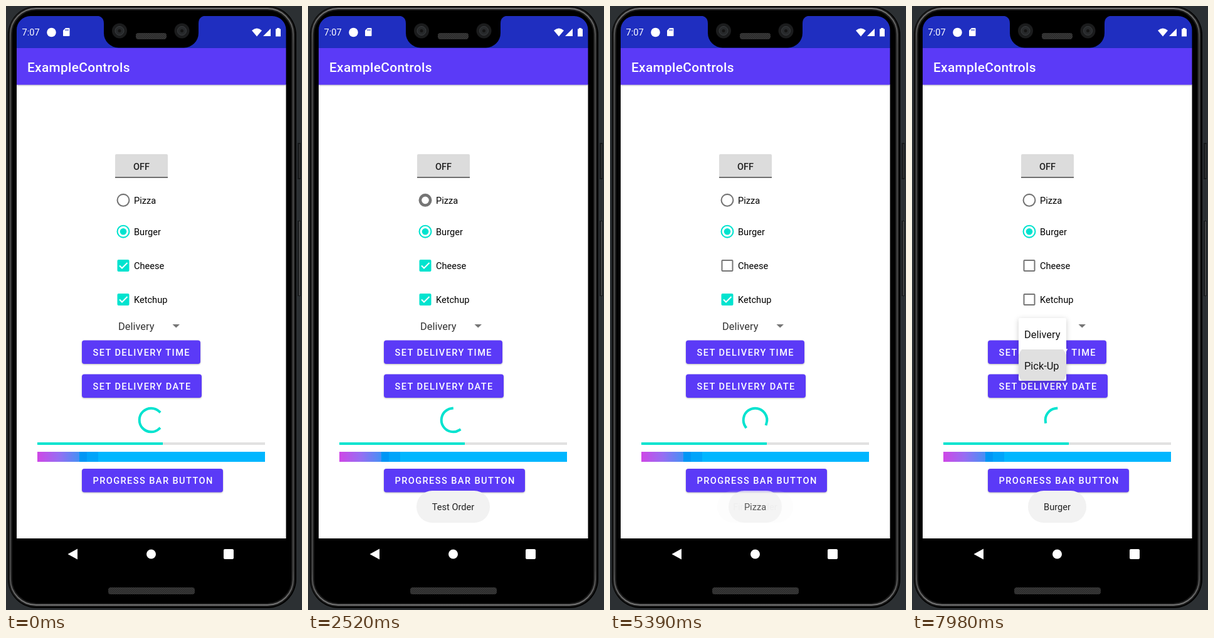
Recreate the animation shown at these times as an HTML page. Size 472x962 px, loop 8 s.

```html
<!DOCTYPE html>
<html lang="en">
<head>
<meta charset="utf-8">
<title>Order form</title>
<style>
  html, body { margin: 0; width: 100%; height: 100%; overflow: hidden; background: #2c3033; }
  svg { display: block; }
  text { font: 14.6px Roboto, sans-serif; }
  .medium { font-weight: 500; }
  .button { font-weight: 500; letter-spacing: 1.4px; fill: #fff; }
  .large { font-size: 16.4px; }
  .shadow { filter: drop-shadow(0 1px 1px #0004); }
</style>
</head>
<body>
<svg width="472" height="962" viewBox="0 0 472 962">
  <defs>
    <linearGradient id="metal" x2="0" y2="1">
      <stop offset="0" stop-color="#777"/><stop offset=".06" stop-color="#4c4c4c"/>
      <stop offset=".94" stop-color="#4c4c4c"/><stop offset="1" stop-color="#777"/>
    </linearGradient>
    <linearGradient id="rainbow">
      <stop offset="0" stop-color="#cf47e6"/><stop offset=".5" stop-color="#986df2"/>
      <stop offset="1" stop-color="#4690f5"/>
    </linearGradient>
    <pattern id="mesh" width="3" height="3" patternUnits="userSpaceOnUse">
      <path d="M0 0h3v3h-3z" fill="#1e1e1e"/><path d="M0 0h1.5v1.5H0zM1.5 1.5H3V3H1.5z" fill="#464646"/>
    </pattern>
    <clipPath id="row"><path d="M170 547h76v50h-76z"/></clipPath>
  </defs>

  <!-- Phone -->
  <path d="M465 218h5v58h-5zM465 342h5v120h-5z" fill="#17191a"/>
  <path d="M468 343v118" stroke="#777"/><path d="M468 220v54" stroke="#484848"/>
  <rect x="3" y="0" width="460" height="959" rx="46"/>
  <g fill="none">
    <rect x="7" y="4" width="451" height="950" rx="41" stroke="#1d1d1d" stroke-width="6"/>
    <rect x="7" y="4" width="451" height="950" rx="41" stroke="url(#metal)" stroke-width="1.800"/>
  </g>
  <path d="M17 67V38A22 22 0 0 1 39 16H424.500A22 22 0 0 1 446.500 38V67Z" fill="#1f2ec0"/>
  <path d="M144 15.500Q156 16 156 28V43A23.500 23.500 0 0 0 179.500 66.500H283.500A23.500 23.500 0 0 0 307 43V28Q307 16 319 15.500Z"/>
  <g id="cameras"></g>
  <rect x="207" y="43" width="49" height="10" rx="4" fill="url(#mesh)"/>
  <rect x="163" y="926" width="138" height="11" rx="4" fill="url(#mesh)"/>

  <!-- Status bar -->
  <g fill="#fff">
    <text x="25.500" y="47">7:07</text>
    <circle cx="72.500" cy="42" r="7.300"/>
    <path d="M95 35h5.500q1 0 1 1v11q0 1-1 1h-8.500q-1 0-1-1V39z"/>
    <path d="M392 39Q400 32 408 39L400 48.500Z"/>
    <path d="M410 48L422 36V48Z"/>
    <path d="M432 35h4v1.500h2V48.500h-8V36.500h2z"/>
  </g>
  <path d="M95 37v2.500M97 37v2.500M99 37v2.500" stroke="#1f2ec0"/>

  <!-- App -->
  <path d="M17 125H446.500V848H17z" fill="#fff"/>
  <path d="M17 67H446.500V125.500H17z" fill="#5b3af7" class="shadow"/>
  <text x="34" y="104.500" class="medium" fill="#fff" style="font-size:20.900px;letter-spacing:.3px">ExampleControls</text>
  <g fill="#fff">
    <path d="M98.500 873L114 864.500V881.500Z"/><circle cx="231.500" cy="873" r="7.500"/>
    <rect x="347" y="865" width="16" height="16" rx="2"/>
  </g>

  <rect x="174" y="236" width="84" height="38" rx="2" fill="#dcdcdc"/>
  <rect id="togglePress" x="174" y="236" width="84" height="38" rx="2"/>
  <path id="toggleLine" d="M174 273h84" stroke-width="2"/>
  <text id="toggleText" x="216" y="261" text-anchor="middle" class="medium" fill="#222"></text>

  <g id="ripples"></g>
  <g id="radios"></g>
  <g id="checks"></g>
  <text x="179" y="516" class="large" fill="#333">Delivery</text>
  <path d="M265.500 507h11.500l-5.750 5.500z" fill="#757575"/>
  <g id="buttons"></g>

  <circle id="spinner" cx="231.500" cy="659.500" r="18.800" pathLength="360" fill="none"
          stroke="#00e3cf" stroke-width="4" stroke-linecap="square"/>
  <path d="M50 695h363v4H50z" fill="#e1e1e1"/><path d="M50 695h200v4H50z" fill="#00e3cf"/>
  <path d="M50 710h363v16H50z" fill="#00b6ff"/>
  <path d="M50 710h67v16H50z" fill="url(#rainbow)"/>
  <path d="M117 710h12v16h-12z" fill="#0096f5"/><path d="M129 710h18v16h-18z" fill="#00a4fa"/>
  <g id="toasts"></g>

  <g id="popup">
    <rect x="170" y="497" width="76" height="100" rx="2" fill="#fff" style="filter:drop-shadow(0 2px 4px #0003)"/>
    <circle id="rowPress" cx="208" cy="572" fill="#e0e0e0" clip-path="url(#row)"/>
    <text x="179" y="528.500" class="large" fill="#111">Delivery</text>
    <text x="179" y="578.500" class="large" fill="#111">Pick-Up</text>
  </g>
</svg>
<script>
const LOOP = 8000, TEAL = '#00e3cf', GREY = '#757575';
const $ = id => document.getElementById(id);
const clamp = v => Math.max(0, Math.min(1, v));
const ramp = (t, start, length) => clamp((t - start) / length);

function add(parent, tag, attrs, text = '') {
  const node = document.createElementNS('http://www.w3.org/2000/svg', tag);
  set(node, attrs);
  node.textContent = text;
  return parent.appendChild(node);
}
function set(node, attrs) {
  for (const name in attrs) node.setAttribute(name, attrs[name]);
}

for (const x of [181, 280.5]) {
  add($('cameras'), 'circle', { cx: x, cy: 39.5, r: 12, fill: '#1b1c1d' });
  add($('cameras'), 'circle', { cx: x, cy: 39.5, r: 7, fill: '#27292b', stroke: '#3a3d40' });
  add($('cameras'), 'circle', { cx: x, cy: 39.5, r: 2.5, fill: '#151515' });
}

for (const [label, y, width] of [['SET DELIVERY TIME', 532.5, 189], ['SET DELIVERY DATE', 586.5, 191], ['PROGRESS BAR BUTTON', 737, 225]]) {
  add($('buttons'), 'rect', { x: 121, y, width, height: 37.5, rx: 4, fill: '#5b3af7', class: 'shadow' });
  add($('buttons'), 'text', { x: 138.5, y: y + 24.3, class: 'button' }, label);
}

const radios = [['Pizza', 309.3, false], ['Burger', 359.2, true]].map(([label, y, initial]) => {
  const g = $('radios');
  add(g, 'text', { x: 204, y: y + 5.7 }, label);
  return {
    initial, times: [1610, 2380],
    ring: add(g, 'circle', { cx: 187, cy: y, fill: 'none' }),
    dot: add(g, 'circle', { cx: 187, cy: y, fill: TEAL })
  };
});

const checks = [['Cheese', 413.5, [4060]], ['Ketchup', 467.5, [3430, 4690, 5740]]].map(([label, y, times]) => {
  const g = add($('checks'), 'g', { transform: `translate(187 ${y})` });
  add(g, 'text', { x: 17, y: 5.5 }, label);
  return {
    times,
    box: add(g, 'rect', { x: -9.5, y: -9.5, width: 19, height: 19, rx: 2 }),
    hole: add(g, 'rect', { x: -7.5, y: -7.5, width: 15, height: 15, fill: '#fff' }),
    tick: add(g, 'path', {
      d: 'M-6 0L-2 4L6.500 -4.500', fill: 'none', stroke: '#fff', 'stroke-width': 2, 'vector-effect': 'non-scaling-stroke'
    })
  };
});

// x, y, press time, length
const ripples = [
  [187, 309.5, 1470, 300], [187, 359.5, 2200, 300], [187, 467.5, 3220, 300], [187, 413.5, 3830, 290],
  [187, 467.5, 4480, 300], [187, 467.5, 5530, 300], [270, 509.5, 6440, 480]
].map(([cx, cy, start, length]) => ({ cx, cy, start, length, node: add($('ripples'), 'circle', {}) }));

const toasts = [['Test Order', 117, 560], ['Final Order', 121, 2860], ['Pizza', 85, 5180], ['Burger', 93, 7500]]
  .map(([label, width, start], i, all) => {
    const node = add($('toasts'), 'g', {});
    add(node, 'rect', { x: 231.5 - width / 2, y: 772, width, height: 51, rx: 25, fill: '#f2f2f2' });
    add(node, 'text', { x: 231.5, y: 803, 'text-anchor': 'middle', fill: '#222' }, label);
    return { node, start, end: all[i + 1]?.[2] ?? LOOP };
  });

// State and time since the last change of something switched at the given times
function switched(times, initial, t) {
  const past = times.filter(time => time <= t);
  return { on: initial !== (past.length % 2 === 1), age: past.length ? t - past.at(-1) : Infinity };
}

// Bezier easing with heights 0, 0, 1, 1 and the given x positions
function ease(x, a, b, c, d) {
  let low = 0, high = 1;
  for (let i = 0; i < 20; i++) {
    const s = (low + high) / 2, r = 1 - s;
    if (r * r * r * a + 3 * r * r * s * b + 3 * r * s * s * c + s * s * s * d < x) low = s; else high = s;
  }
  return low * low * (3 - 2 * low);
}

function drawSpinner(t) {
  const seconds = t / 1050, cycles = 0.447 + seconds / 1.3333;
  const turn = Math.floor(cycles), phase = cycles - turn;
  const tail = ease(phase, 0.5, 0.7, 0.6, 1), head = ease(phase, 0, 0.2, 0.1, 0.5);
  const angle = 136 + 229.5 * seconds + 270 * (turn + tail) - 90;
  set($('spinner'), {
    transform: `rotate(${angle % 360} 231.5 659.5)`,
    'stroke-dasharray': `${Math.max(0.1, 270 * (head - tail))} 360`
  });
}

function drawRadio({ ring, dot, times, initial }, t) {
  const { on, age } = switched(times, initial, t);
  const k = clamp(age / (on ? 130 : 320));
  const width = 2.1 + 2.6 * Math.sin(Math.PI * k);
  set(ring, { r: 10.5 - width / 2, 'stroke-width': width, stroke: on || k < 0.2 ? TEAL : GREY });
  set(dot, { r: 5.3 * clamp(on ? 2 * k - 1 : 1 - 2.5 * k) });
}

function drawCheck({ box, hole, tick, times }, t) {
  const { on, age } = switched(times, true, t);
  const k = clamp(age / 170), fill = on ? k : 1 - k;
  set(box, { fill: fill > 0.12 ? TEAL : GREY, transform: `scale(${1 - 0.07 * Math.sin(Math.PI * fill)})` });
  set(hole, { transform: `scale(${clamp(1 - 4 * fill)})` });
  set(tick, { transform: `scale(${clamp(1.3 * fill - 0.3)})` });
}

function drawRipple({ node, cx, cy, start, length }, t) {
  const grow = ramp(t, start, 200);
  set(node, {
    cx: cx + 8 * (1 - grow), cy: cy + 3 * (1 - grow), r: 8 + 11 * grow,
    opacity: 0.12 * ramp(t, start, 130) * (1 - ramp(t, start + length - 100, 100))
  });
}

function draw(t) {
  const { on } = switched([490, 980], false, t);
  $('toggleText').textContent = on ? 'ON' : 'OFF';
  set($('toggleLine'), { stroke: on ? TEAL : '#707070' });
  const press = start => ramp(t, start, 90) * (1 - ramp(t, start + 170, 130));
  set($('togglePress'), { opacity: 0.12 * (press(400) + press(890)) });

  radios.forEach(radio => drawRadio(radio, t));
  checks.forEach(check => drawCheck(check, t));
  ripples.forEach(ripple => drawRipple(ripple, t));
  drawSpinner(t);
  for (const { node, start, end } of toasts) {
    set(node, { opacity: ramp(t, start, 280) * (1 - ramp(t, end, 240)) });
  }

  set($('popup'), { opacity: ramp(t, 6860, 180) });
  set($('rowPress'), { r: 46 * ramp(t, 7810, 190) });
}

function frame() {
  draw(performance.now() % LOOP);
  requestAnimationFrame(frame);
}
frame();
</script>
</body>
</html>
```
